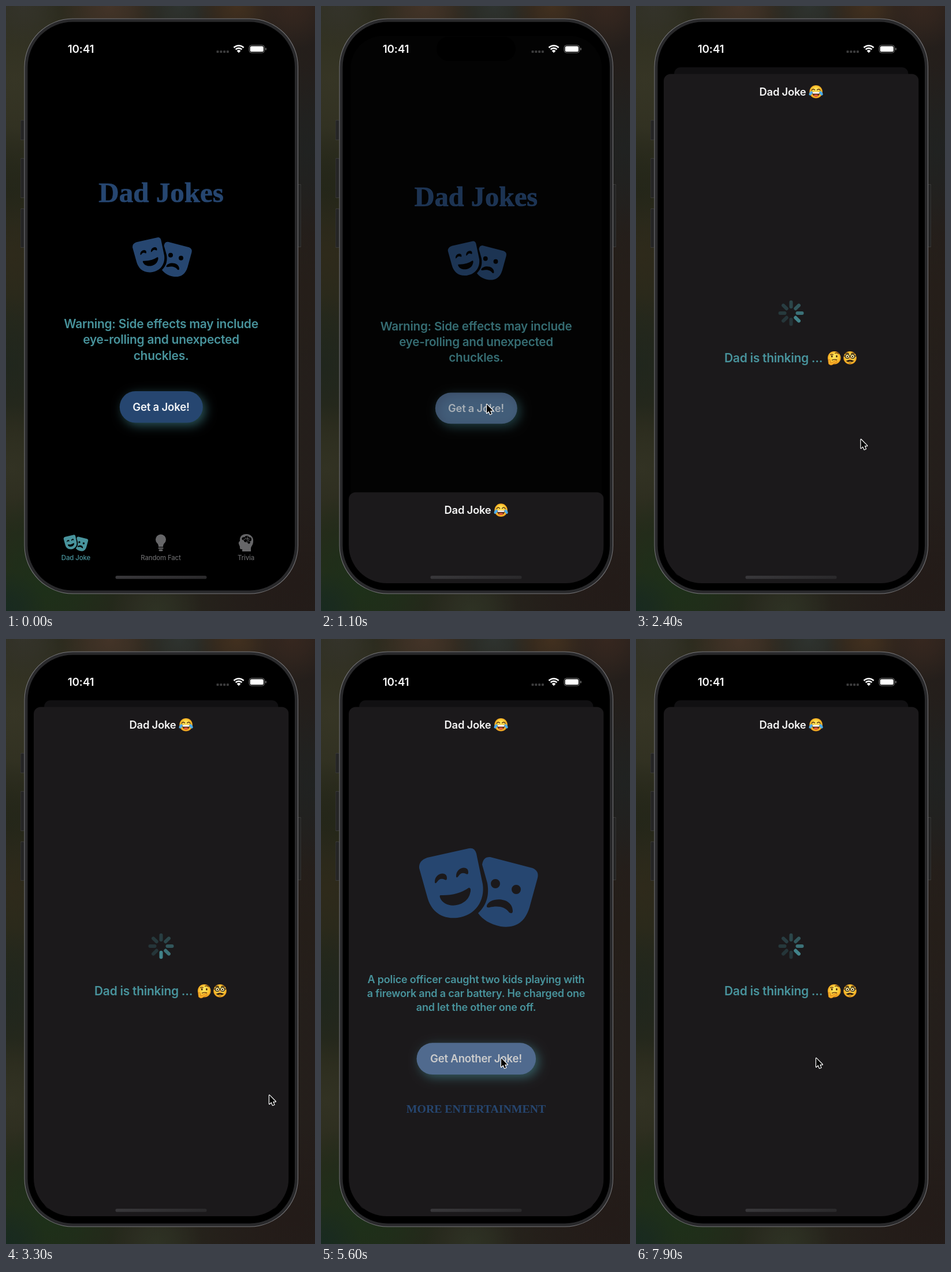
These frames come from a looping animation (535 px wide and 1046 px high, 8 s). An HTML page with a canvas:

```html
<!DOCTYPE html>
<html lang="en">
<head>
<meta charset="utf-8">
<title>Dad Jokes app</title>
<style>
html, body { margin: 0; width: 100%; height: 100%; overflow: hidden; background: #24231c; }
canvas { display: block; width: 535px; height: 1046px; }
</style>
</head>
<body>
<canvas id="stage" width="535" height="1046"></canvas>
<script>
const ctx = document.getElementById('stage').getContext('2d');
const LOOP = 8000, STEP = 100, MID = 268.5;
const BLUE = '#264670', TEAL = '#48939c', SHEET = '#1b191b', GREY = '#666668';
const SANS = 'Inter, "Open Sans", sans-serif';
const SERIF = '"Liberation Serif", "Noto Serif", serif';
const SCREEN = { x: 48, y: 40, w: 441.5, h: 958, r: 66 };

const TIMES = { press: 950, sheet: 1058, joke: 3900, pressAgain: 5600, reload: 5700 };
// time, x, y of the pointer tip
const POINTER = [[300, 548, 860], [900, 287, 688], [2000, 287, 688],
  [2700, 456, 788], [4900, 456, 788], [5500, 312, 724], [LOOP, 312, 724]];

// x, y, radius, colour of the blurred wallpaper
const BLOBS = [
  [15, 130, 190, '54,53,37'], [0, 330, 120, '36,38,25'], [10, 430, 110, '46,42,27'],
  [0, 620, 120, '32,38,29'], [10, 800, 110, '50,50,35'], [70, 1000, 160, '29,48,25'],
  [30, 0, 70, '52,51,42'], [180, 0, 90, '68,52,40'], [300, 0, 70, '46,51,47'],
  [400, 0, 70, '66,48,31'], [495, 0, 75, '54,39,31'], [530, 250, 150, '32,34,33'],
  [530, 500, 150, '37,30,25'], [260, 1046, 80, '46,50,36'], [500, 1000, 170, '35,27,24'],
  [0, 1046, 70, '24,42,32']
];

const masks = new Path2D(
  'M184 378L256 362Q266 360 269 371L280 424C284 452 268 478 236 482C206 485 190 468 184 446L170 396Q169 383 184 378Z' +
  'M197 421C196 404 219 400 218 414Q218 418 214 416Q206 412 201 420Q198 424 197 421Z' +
  'M234 411C233 394 256 390 255 404Q255 408 251 406Q243 402 238 410Q235 414 234 411Z' +
  'M207 443Q236 444 256 430Q261 430 258 440C252 464 214 468 206 447Q205 443 207 443Z' +
  'M293 377L366 396Q378 401 375 413L361 464C352 494 332 500 311 497C292 493 280 485 272 474C289 458 291 440 288 422L279 390Q281 376 293 377Z' +
  'M294 423a8 8 0 1 0 16 0a8 8 0 1 0-16 0Z' +
  'M330 433a8 8 0 1 0 16 0a8 8 0 1 0-16 0Z' +
  'M287 461C292 446 331 445 332 470Q332 476 326 473C318 462 305 461 292 464Q286 465 287 461Z');
const head = new Path2D('M409 943V939Q404 940 405 935L403 930Q402 927 405 925C404 917 409 913 416 913C424 913 429 919 428 926C428 932 424 934 424 938V943Z');
const arrow = new Path2D('M0 0V15L3.4 11.8L5.8 17.2L8.3 16.1L6 10.9H10.7Z');

const lerp = (a, b, k) => a + (b - a) * k;
const smooth = k => k * k * (3 - 2 * k);

function pill(x, y, w, h, r, fill) {
  ctx.fillStyle = fill;
  ctx.beginPath();
  ctx.roundRect(x, y, w, h, r);
  ctx.fill();
}

function disc(x, y, r, fill, ry = r, turn = 0) {
  ctx.fillStyle = fill;
  ctx.beginPath();
  ctx.ellipse(x, y, r, ry, turn, 0, 7);
  ctx.fill();
}

function stroke(path, color, width) {
  ctx.strokeStyle = color;
  ctx.lineWidth = width;
  ctx.stroke(new Path2D(path));
}

function text(str, x, y, size, weight, color, align = 'center', family = SANS) {
  ctx.font = `${weight} ${size}px ${family}`;
  ctx.letterSpacing = family === SANS ? `${-.012 * size}px` : '0px';
  ctx.textAlign = align;
  ctx.fillStyle = color;
  ctx.fillText(str, x, y);
}

function at(x, y, scale, draw) {
  ctx.save();
  ctx.translate(x, y);
  ctx.scale(scale, scale);
  draw();
  ctx.restore();
}

function drawMasks(x, y, scale, color) {
  at(x, y, scale, () => {
    ctx.translate(-273, -429.5);
    ctx.fillStyle = color;
    ctx.fill(masks, 'evenodd');
  });
}

function button(label, y, w, h, pressed) {
  ctx.save();
  ctx.shadowColor = 'rgba(72,147,156,.55)';
  ctx.shadowBlur = 18;
  ctx.shadowOffsetX = ctx.shadowOffsetY = 5;
  pill(MID + .3 - w / 2, y, w, h, h / 2, pressed ? '#506a8e' : BLUE);
  ctx.restore();
  text(label, MID, y + h / 2 + 6.7, 18.6, 600, pressed ? '#ccc' : '#f4f6f8');
}

function wallpaper() {
  const base = ctx.createLinearGradient(0, 0, 535, 0);
  base.addColorStop(0, '#28291b');
  base.addColorStop(1, '#241e1b');
  ctx.fillStyle = base;
  ctx.fillRect(0, 0, 535, 1046);
  for (const [x, y, r, c] of BLOBS) {
    const g = ctx.createRadialGradient(x, y, 0, x, y, r);
    g.addColorStop(0, `rgba(${c},1)`);
    g.addColorStop(.4, `rgba(${c},.7)`);
    g.addColorStop(1, `rgba(${c},0)`);
    ctx.fillStyle = g;
    ctx.fillRect(x - r, y - r, 2 * r, 2 * r);
  }
}

function phone() {
  for (const [x, y, h] of [[25, 197, 35], [25, 263, 69], [25, 350, 68], [504, 308, 109]]) {
    pill(x, y, 7, h, 1.5, '#3a3a38');
    pill(x + .5, y + 1, 6, h - 2, 1.5, '#252525');
  }
  pill(31.5, 21.5, 474.5, 995, 84, '#77777a');
  pill(32.5, 22.5, 472.5, 993, 83, '#29292b');
  pill(37.5, 27.5, 462.5, 983, 78, '#000');
}

function statusBar() {
  text('10:41', 129.5, 80.7, 19, 600, '#f5f5f5');
  for (let i = 0; i < 4; i++) pill(364.5 + i * 5.8, 77, 4, 4, 1, '#3c3c3d');
  ctx.lineCap = 'butt';
  ctx.strokeStyle = '#fff';
  ctx.lineWidth = 2.7;
  for (const r of [12, 7.6]) {
    ctx.beginPath();
    ctx.arc(403, 80.5, r, -Math.PI * .75, -Math.PI * .25);
    ctx.stroke();
  }
  ctx.fillStyle = '#fff';
  ctx.fill(new Path2D('M403 81L399.6 77.4Q403 74.6 406.4 77.4Z'));
  ctx.strokeStyle = '#777';
  ctx.lineWidth = 1;
  ctx.beginPath();
  ctx.roundRect(421, 67.8, 26.5, 13, 4);
  ctx.stroke();
  pill(422.7, 69.5, 23.1, 9.6, 2.6, '#fff');
  pill(449, 72.3, 1.6, 4.2, 1, '#777');
}

function tabs() {
  drawMasks(121, 928.3, .207, TEAL);
  disc(268, 922.5, 9, GREY);
  ctx.fill(new Path2D('M260 926Q264 930 264 935H272Q272 930 276 926Z'));
  pill(263.5, 936.2, 9, 2.2, 1, GREY);
  pill(264.5, 939.4, 7, 3, 1.5, GREY);
  ctx.fillStyle = GREY;
  ctx.fill(head);
  disc(412, 921, 3.6, '#000', 2.8);
  disc(417, 918.5, 3.6, '#000', 2.5);
  disc(422, 922, 3, '#000', 3.6);
  disc(416, 924.5, 4, '#000', 2.6);
  disc(420.5, 927.5, 2.2, '#000');
  stroke('M411 922Q415 923 415 919M418 917V921L422 922M416 926Q419 923 421 925', GREY, 1);
  text('Dad Joke', 121, 957.5, 11.5, 500, TEAL);
  text('Random Fact', 268, 957.5, 11.4, 500, GREY);
  text('Trivia', 415.5, 957.5, 11.4, 500, GREY);
}

function home(p, pressed) {
  const scale = lerp(1, .918, p), s = SCREEN;
  ctx.save();
  ctx.translate(MID * (1 - scale), 69.3 * p);
  ctx.scale(scale, scale);
  pill(s.x, s.y, s.w, s.h, lerp(s.r, 12, p), `rgb(${17 * p},${16 * p},${18 * p})`);
  ctx.globalAlpha = 1 - Math.min(.45, 1.5 * p);
  text('Dad Jokes', MID, 339, 49, 700, BLUE, 'center', SERIF);
  ctx.strokeStyle = BLUE;
  ctx.lineWidth = .7;
  ctx.strokeText('Dad Jokes', MID, 339);
  drawMasks(270.5, 434, .5, BLUE);
  ['Warning: Side effects may include', 'eye-rolling and unexpected', 'chuckles.']
    .forEach((line, i) => text(line, MID, 556.8 + i * 27.5, 20.95, 600, TEAL));
  button('Get a Joke!', 666, 144, 54.5, pressed);
  tabs();
  ctx.restore();
  pill(200, 53, 137, 42, 21, '#000');
}

// Emoji faces are drawn in a 24-unit box around the origin
function face() {
  const g = ctx.createRadialGradient(0, -3, 2, 0, 0, 12);
  g.addColorStop(0, '#ffe45c');
  g.addColorStop(.65, '#fcc531');
  g.addColorStop(1, '#e8901a');
  disc(0, 0, 11.3, g);
  ctx.lineCap = 'round';
}

function laughing() {
  face();
  stroke('M-7.5 -2.5Q-5 -6.5 -2 -3M2 -3Q5 -6.5 7.5 -2.5', '#5a3210', 1.5);
  ctx.fillStyle = '#5a2a12';
  ctx.fill(new Path2D('M-7 .5H7C6.5 11 -6.5 11 -7 .5Z'));
  pill(-6, .5, 12, 2.6, 1, '#fff');
  disc(0, 6.5, 3.6, '#e8583c', 1.7);
  disc(-9, 2.6, 2.4, '#4cabe8', 4, .55);
  disc(9, 2.6, 2.4, '#4cabe8', 4, -.55);
}

function thinking() {
  face();
  disc(-4, -2.5, 1.4, '#4a2a10', 1.9);
  disc(4.2, -2.5, 1.4, '#4a2a10', 1.9);
  stroke('M-6.8 -5.2Q-4 -6.6 -1.8 -5.4M1.6 -7.8Q5 -10 7.4 -6.8', '#6b3d12', 1.3);
  stroke('M-3.5 4Q.5 2 4.6 3.6', '#5a3210', 1.3);
  stroke('M-8.6 5L-8 9.5Q-5 12 -2 9L3 6.3', '#c9740f', 4.4);
  stroke('M-8.6 5L-8 9.5Q-5 12 -2 9L3 6.3', '#f7ae28', 3.2);
}

function disguised() {
  face();
  stroke('M-7.5 -7.2Q-5 -8.8 -2 -7.2M2 -7.2Q5 -8.8 7.5 -7.2', '#3b2412', 1.4);
  disc(-4.5, -2.4, 3, '#fbe9a4');
  disc(4.5, -2.4, 3, '#fbe9a4');
  stroke('M-8.1 -2.4a3.6 3.6 0 1 0 7.2 0a3.6 3.6 0 1 0-7.2 0M.9 -2.4a3.6 3.6 0 1 0 7.2 0a3.6 3.6 0 1 0-7.2 0M-10.6 -3H-8.3M8.3 -3H10.6', '#1c1a1a', 1.3);
  disc(-4.5, -2.2, 1.1, '#2c1a10', 1.5);
  disc(4.5, -2.2, 1.1, '#2c1a10', 1.5);
  disc(0, 1.6, 1.9, '#f0a83a', 2.5);
  ctx.fillStyle = '#33200f';
  ctx.fill(new Path2D('M0 4C-3 2.6 -4.5 5.6 -7 4.4C-5.5 8 -2 8 0 6.2C2 8 5.5 8 7 4.4C4.5 5.6 3 2.6 0 4Z'));
  stroke('M-1.6 8.8H1.6', '#5a3210', .9);
}

function spinner(x, y, lead) {
  const fade = [.87, .72, .5, .37, .3, .26, .23, .23];
  ctx.save();
  ctx.translate(x, y);
  for (let i = 0; i < 8; i++) {
    ctx.globalAlpha = fade[(((lead - i) % 8) + 8) % 8];
    pill(-3, -22, 6, 14, 3, TEAL);
    ctx.rotate(Math.PI / 4);
  }
  ctx.restore();
}

function loading(top, lead) {
  spinner(MID, top + 413.5, lead);
  text('Dad is thinking ...', 153, top + 498.2, 20.95, 600, TEAL, 'left');
  at(343.2, top + 490.7, 1, thinking);
  at(370.5, top + 490.7, 1, disguised);
}

function joke(pressed) {
  drawMasks(273, 429.5, 1, BLUE);
  ['A police officer caught two kids playing with',
    'a firework and a car battery. He charged one',
    'and let the other one off.']
    .forEach((line, i) => text(line, MID, 594.5 + i * 24.2, 18.05, 600, TEAL));
  button('Get Another Joke!', 698.3, 206.5, 54.7, pressed);
  text('MORE ENTERTAINMENT', MID, 819, 19.8, 700, BLUE, 'center', SERIF);
}

function sheet(t, p) {
  const s = SCREEN, top = lerp(s.y + s.h, 117.5, p);
  ctx.save();
  ctx.beginPath();
  ctx.roundRect(s.x, s.y, s.w, s.h, s.r);
  ctx.clip();
  pill(s.x, top, s.w, 1000, 12, SHEET);
  text('Dad Joke', 213.5, top + 37.3, 18.4, 600, '#f5f5f5', 'left');
  at(311.6, top + 30.8, 1, laughing);
  if (t >= TIMES.joke && t < TIMES.reload) joke(t >= TIMES.pressAgain);
  else loading(top, 2 + Math.round((t - (t < TIMES.joke ? 1500 : 6200)) / 100));
  ctx.restore();
}

function pointer(t) {
  const i = POINTER.findIndex(k => k[0] > t);
  if (i < 1) return;
  const [t0, x0, y0] = POINTER[i - 1], [t1, x1, y1] = POINTER[i];
  const k = smooth((t - t0) / (t1 - t0));
  at(lerp(x0, x1, k), lerp(y0, y1, k) + .8, 1, () => {
    ctx.lineJoin = 'round';
    ctx.strokeStyle = '#fff';
    ctx.lineWidth = 2.4;
    ctx.stroke(arrow);
    ctx.fillStyle = '#000';
    ctx.fill(arrow);
  });
}

function render(t) {
  // Critically damped spring drives the sheet and the view behind it
  const w = Math.max(0, t - TIMES.sheet) * .0182;
  const p = 1 - (1 + w) * Math.exp(-w);
  wallpaper();
  phone();
  home(p, t >= TIMES.press);
  statusBar();
  if (p > 0) sheet(t, p);
  const bar = ctx.createLinearGradient(190, 0, 348, 0);
  bar.addColorStop(0, '#38373a');
  bar.addColorStop(1, '#2a292b');
  pill(189.5, 985, 158, 5.6, 2.8, bar);
  pointer(t);
}

function tick() {
  const t = performance.now() % LOOP;
  render(Math.floor(t / STEP) * STEP);
  requestAnimationFrame(tick);
}
tick();
</script>
</body>
</html>
```
